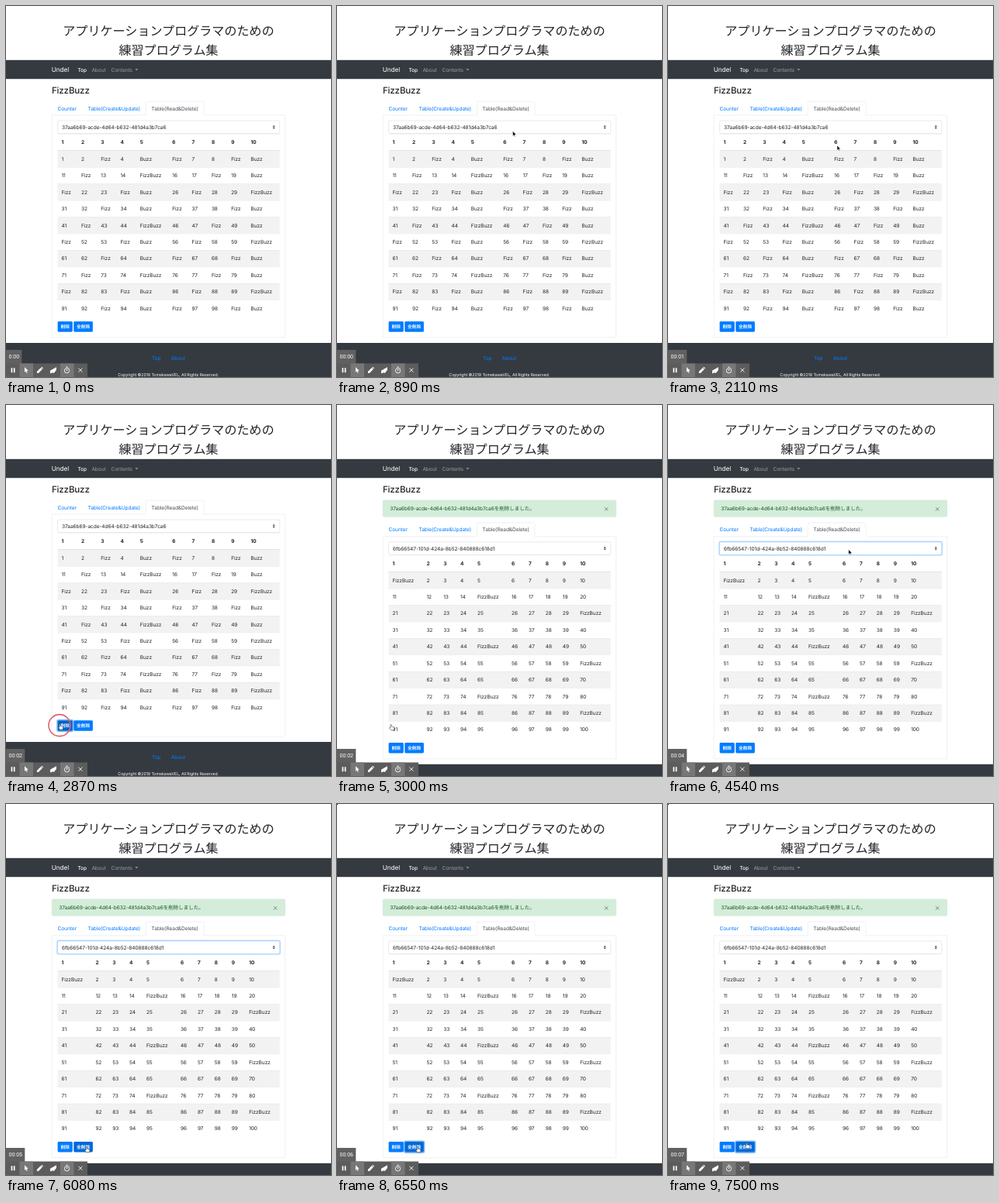
Animation of 419 by 479 pixels, one loop 8000 ms. Source, as an HTML page:

```html
<!DOCTYPE html>
<html lang="ja">
<head>
<meta charset="utf-8">
<title>FizzBuzz</title>
<style>
html, body { margin: 0; width: 100%; height: 100%; overflow: hidden; background: #fff; }
svg { display: block; width: 100vw; height: 100vh; }
text {
  font-family: Inter, "Noto Sans CJK JP", "Noto Sans CJK", sans-serif;
  letter-spacing: -.0136em;
  fill: #212529;
  text-rendering: geometricPrecision;
  white-space: pre;
}
.title { font-weight: 500; letter-spacing: 0; }
.bold { font-weight: 700; }
.mid { text-anchor: middle; }
.link { fill: #007bff; }
.white { fill: #fff; }
.dim { fill: #9a9da0; }
.tab { fill: #495057; }
.ok { fill: #155724; }
#clock { font-family: Roboto, sans-serif; letter-spacing: 0; fill: #fff; }
.select { fill: #fff; stroke: #ced4da; stroke-width: .5; }
.select.focus { stroke: #80bdff; }
.glow { fill: none; stroke: #007bff; stroke-width: 1.5; }
.button { fill: #007bff; }
.button.hover { fill: #0069d9; }
.button.down { fill: #0062cc; }
</style>
</head>
<body>
<svg id="stage" viewBox="0 0 419 479" preserveAspectRatio="none"></svg>
<script>
const LOOP = 8000, DELETED = 3000, SHIFT = 28.8;
const ids = ['37aa6b69-acde-4d64-b632-481d4a3b7ca6', '6fb66547-101d-424a-8b52-840888c618d1'];

const text = (x, y, s, cls = '', size = 7) =>
  `<text x="${x}" y="${y + .34 * size}" font-size="${size * .943}" class="${cls}">${s}</text>`;
const rect = (x, y, w, h, fill, extra = '') =>
  `<rect x="${x}" y="${y}" width="${w}" height="${h}" fill="${fill}" ${extra}/>`;
const path = (d, extra = '') => `<path d="${d}" ${extra}/>`;

const classic = n => (n % 3 ? '' : 'Fizz') + (n % 5 ? '' : 'Buzz') || n;
const sparse = n => n === 1 || n % 15 === 0 ? 'FizzBuzz' : n;

function table(cols, cell) {
  const left = 66.6, width = 286.2, top = 186.6, rowH = 21.43;
  let out = rect(left, 164.9, width, .45, '#dee2e6');
  cols.forEach((x, c) => out += text(x, 175.6, c + 1, 'bold'));
  for (let r = 0; r < 10; r++) {
    const y = top + r * rowH;
    if (r % 2 === 0) out += rect(left, y, width, rowH, '#f2f2f2');
    out += rect(left, y - (r ? 0 : .45), width, r ? .45 : .9, '#dee2e6');
    cols.forEach((x, c) => out += text(x, y + 10.8, cell(r * 10 + c + 1)));
  }
  return out;
}

function button(name, x, w, label) {
  return rect(x - .7, 406.5, w + 1.4, 14.9, 'none', `class="glow" id="${name}Glow" opacity=".5" rx="2"`) +
    rect(x, 407.2, w, 13.5, '#007bff', `class="button" id="${name}" rx="1.4"`) +
    text(x + w / 2, 414, label, 'white bold mid', 6.1);
}

function page(i, cols, cell) {
  const tabs =
    path('M59.2 141H180.3V125Q180.3 123.2 182 123.2H253.3Q255 123.2 255 125V141H359.8V428H59.2Z',
      'fill="#fff" stroke="#dee2e6" stroke-width=".5"') +
    text(66.5, 132.2, 'Counter', 'link') +
    text(105.5, 132.2, 'Table(Create&amp;Update)', 'link') +
    text(187.6, 132.2, 'Table(Read&amp;Delete)', 'tab');
  const select =
    rect(65.9, 147.4, 287.6, 17.8, 'none', `class="glow" id="selGlow${i}" opacity=".25" rx="2.2"`) +
    rect(66.6, 148.1, 286.2, 16.4, '#fff', `class="select" id="sel${i}" rx="1.7"`) +
    text(72, 156.4, ids[i]) +
    path('M343.7 155.8h3.2l-1.6-1.9zM343.7 156.8h3.2l-1.6 1.9z', 'fill="#343a40"');
  const footer = rect(0, 435, 419, 60, '#343a40') +
    text(188, 454.4, 'Top', 'link') + text(212.8, 454.4, 'About', 'link') +
    text(209.2, 475.6, 'Copyright ©2019 TomekawaVEL, All Rights Reserved.', 'white mid', 5.6);
  return `<g id="page${i}" transform="translate(0 ${i * SHIFT})">` + tabs + select + table(cols, cell) +
    button('del' + i, 66.6, 19.2, '削除') + button('all' + i, 87.3, 24.6, '全削除') + footer + '</g>';
}

const header =
  text(209.5, 32.2, 'アプリケーションプログラマのための', 'title mid', 17.07) +
  text(209.5, 56.8, '練習プログラム集', 'title mid', 17.07) +
  rect(0, 69.8, 419, 24.4, '#343a40') +
  text(58.8, 82.2, 'Undel', 'white', 8.75) +
  `<g font-weight="500">${text(92.4, 82.3, 'Top', 'white')}</g>` +
  text(110.4, 82.3, 'About', 'dim') + text(135.5, 82.3, 'Contents', 'dim') +
  path('M166.3 81.2h4.2l-2.1 2.1z', 'fill="#9a9da0"') +
  `<g font-weight="500">${text(58.9, 108.8, 'FizzBuzz', '', 12.25)}</g>`;

const alertBox = '<g id="alert">' +
  rect(59.2, 122.9, 300.6, 21.4, '#d4edda', 'stroke="#c3e6cb" stroke-width=".5" rx="1.7"') +
  text(68.2, 133.8, ids[0] + 'を削除しました。', 'ok') +
  path('M345.2 132.3l4.2 4.2m0-4.2l-4.2 4.2', 'stroke="#6a776d" stroke-width=".9"') + '</g>';

const toolbar =
  rect(0, 444, 24, 18, '#616161', 'id="clockBox"') +
  '<text id="clock" x="3.6" y="455" font-size="7"></text>' +
  rect(0, 461.5, 105, 17.5, '#5c5c5c') +
  rect(17.5, 461.5, 17.5, 17.5, '#777') + rect(70, 461.5, 17.5, 17.5, '#777') +
  '<g fill="#fff">' +
  path('M6.6 467.2h1.7v6h-1.7zM9.8 467.2h1.7v6h-1.7z') +
  path('M24 466.2v6.6l1.5-1.3 1 2.3 1.2-.5-1-2.2h2z') +
  path('M39.9 474v-2l4.9-4.9 2 2-4.9 4.9zM45.3 466.6l.8-.8 2 2-.8.8z') +
  path('M57 470.8l7.9-4.6v3.9l-3.2 3.8-1.6-.7-3.1 1.2z') + '</g>' +
  '<g fill="none" stroke="#fff" stroke-width=".9">' +
  '<circle cx="78.5" cy="470.8" r="3.1"/>' +
  path('M77.3 466.2h2.4M78.5 471v-2M80.9 468.3l.8-.8') +
  path('M93.4 467.7l5 5m0-5l-5 5') + '</g>';

const pointer =
  '<circle id="ring" fill="none" stroke="#e0606e" stroke-width="1.6"/>' +
  path('M0 0V6.3L1.4 5 2.3 7.1 3.3 6.7 2.4 4.7H4.5Z',
    'id="arrow" fill="#000" stroke="#fff" stroke-width=".5"') +
  path('M1.9 4.6V.9a.65.65 0 0 1 1.3 0V3q.6-.4 1.1.1.6-.3 1.1.2 1-.2 1.1.8V5.5Q6.5 6.6 5.9 7.6H2.5Q1.7 6.3 .4 5 .5 3.9 1.9 4.6Z',
    'id="hand" fill="#fff" stroke="#222" stroke-width=".5"');

const stage = document.getElementById('stage');
stage.innerHTML = rect(0, 0, 419, 479, '#fff') + header + alertBox +
  page(0, [71.5, 97, 122.3, 147.5, 172.8, 214.3, 239.6, 264.9, 290.2, 315.5], classic) +
  page(1, [71.5, 115.4, 137.2, 159, 181, 225, 247, 268.8, 290.8, 313.2], sparse) +
  toolbar + pointer + rect(0, 0, 1, 1, '#000', 'id="dot"');

const $ = id => document.getElementById(id);
const show = (id, on) => $(id).style.display = on ? '' : 'none';
const within = (t, a, b) => t >= a && t < b;

// Pointer stops: time, x, y, shape; no shape hides it
const stops = [
  [0], [440, 62, 408, 'arrow'], [590, 150, 270, 'arrow'], [740, 243, 152, 'arrow'],
  [890, 226.6, 161.6, 'arrow'], [1700],
  [1990, 218, 180, 'arrow'], [2130, 170, 265, 'arrow'], [2280, 104, 362, 'arrow'],
  [2420, 74, 400, 'arrow'], [2570, 67, 411.6, 'hand'], [3000, 67, 412.2, 'hand'],
  [3490, 82, 395, 'arrow'], [3640, 125, 335, 'arrow'], [3790, 176, 262, 'arrow'],
  [3940, 215, 208, 'arrow'], [4090, 231, 190, 'arrow'], [4240, 232.8, 186.6, 'arrow'],
  [5440, 218, 218, 'arrow'], [5580, 176, 310, 'arrow'], [5740, 128, 402, 'arrow'],
  [5910, 106, 438, 'hand'], [6080, 101.3, 442.2, 'hand'], [7220], [7500, 98.9, 437.2, 'hand']
];
// Click rings: start, end, x, y, radius
const clicks = [
  [2720, 2870, 69, 413.6, 10], [2870, 3000, 69, 413.6, 14],
  [4390, 4540, 233, 188, 10.3], [6240, 6420, 103.5, 444, 9.3]
];
const ticks = [1030, 2130, 3130, 4090, 4980, 6240, 6870];

function setButton(name, state, focus) {
  $(name).setAttribute('class', 'button ' + state);
  show(name + 'Glow', focus);
}

function drawPointer(t) {
  const [, x, y, shape] = stops.filter(s => s[0] <= t).pop();
  for (const id of ['arrow', 'hand']) {
    show(id, id === shape);
    if (id === shape) $(id).setAttribute('transform', `translate(${x} ${y})`);
  }
  const click = clicks.find(c => within(t, c[0], c[1]));
  show('ring', click);
  if (click) ['cx', 'cy', 'r'].forEach((k, i) => $('ring').setAttribute(k, click[i + 2]));
}

function draw(t) {
  const after = t >= DELETED;
  show('page0', !after);
  show('page1', after);
  show('alert', after);
  show('selGlow0', false);

  const focused = within(t, 4540, 6240);
  show('selGlow1', focused);
  $('sel1').setAttribute('class', focused ? 'select focus' : 'select');

  setButton('del0', t >= 2720 ? 'down' : t >= 2570 ? 'hover' : '', t >= 2720);
  setButton('all0', '', false);
  setButton('del1', '', false);
  setButton('all1', within(t, 6240, 6420) ? 'down' : t >= 5910 ? 'hover' : '', t >= 6240);

  const sec = ticks.filter(k => t >= k).length;
  $('clock').textContent = t < 100 ? '0:00' : '00:0' + sec;
  $('clockBox').setAttribute('width', t < 100 ? 20.3 : 24.3);
  show('dot', t >= 6550);
  drawPointer(t);
}

const start = performance.now();
function frame() {
  draw((performance.now() - start) % LOOP);
  requestAnimationFrame(frame);
}
frame();
</script>
</body>
</html>
```
